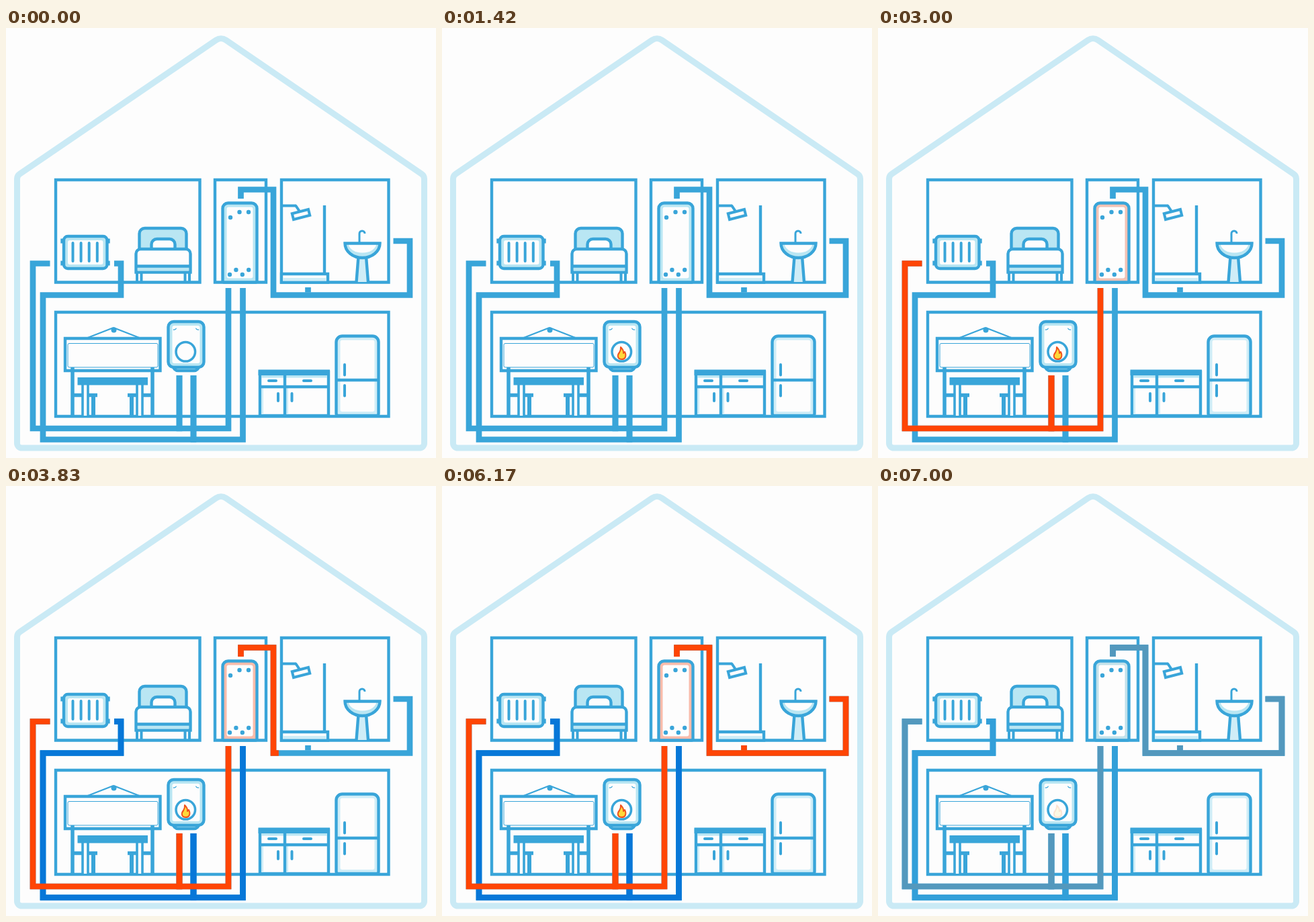
Recreate the animation shown at these times as an HTML page with a canvas. Size 640 by 640 pixels, loop 7.08 s.

```html
<!DOCTYPE html>
<html lang="en">
<head>
<meta charset="utf-8">
<title>Home heating</title>
<style>
html, body { margin: 0; width: 100%; height: 100%; overflow: hidden; background: #fdfdfd; }
canvas { display: block; width: 640px; height: 640px; }
</style>
</head>
<body>
<canvas id="stage" width="640" height="640"></canvas>
<script>
const ctx = document.getElementById('stage').getContext('2d');
const PAPER = '#fdfdfd', INK = '#39a5d9', WALL = '#caeaf5', TINT = '#b9e6f3', PALE = '#cfedf7';
const HOT = '#ff4505', COLD = '#0777d8', WARM = '#fbbcab';
const LOOP = 7080, FPS = 12, PIPE = 8.7, WEIGHT = 4.4;

// ---- helpers ----
const ramp = (t, a, b) => Math.min(1, Math.max(0, (t - a) / (b - a)));

function blend(a, b, k) {
  const part = (s, i) => parseInt(s.slice(i, i + 2), 16);
  const mix = [1, 3, 5].map(i => Math.round(part(a, i) + (part(b, i) - part(a, i)) * k));
  return `rgb(${mix.join(',')})`;
}

function stroke(width = WEIGHT, color = INK, cap = 'butt') {
  ctx.strokeStyle = color;
  ctx.lineWidth = width;
  ctx.lineCap = cap;
  ctx.stroke();
}

function fill(color) {
  ctx.fillStyle = color;
  ctx.fill();
}

function line(x1, y1, x2, y2, width, cap) {
  ctx.beginPath();
  ctx.moveTo(x1, y1);
  ctx.lineTo(x2, y2);
  stroke(width, INK, cap);
}

const across = (y, x1, x2, width) => line(x1, y, x2, y, width);
const down = (x, y1, y2, width) => line(x, y1, x, y2, width);
const handle = (x, y, w, h) => line(x, y, x + w, y + h, 4, 'round');

function box(x1, y1, x2, y2, r = 0, color = null, width = WEIGHT) {
  ctx.beginPath();
  ctx.roundRect(x1, y1, x2 - x1, y2 - y1, r);
  if (color) fill(color);
  if (width) stroke(width);
}

const solid = (x1, y1, x2, y2, color = INK) => box(x1, y1, x2, y2, 0, color, 0);

function circle(x, y, r, color, width = 0) {
  ctx.beginPath();
  ctx.arc(x, y, r, 0, 7);
  fill(color);
  if (width) stroke(width);
}

// Rounded body with a tinted rim inside its outline.
function shell(x1, y1, x2, y2, r, tint = TINT, rim = 6) {
  box(x1, y1, x2, y2, r, tint, 0);
  box(x1 + rim, y1 + rim, x2 - rim, y2 - rim, 3, PAPER, 0);
  box(x1, y1, x2, y2, r);
}

// Calls part(at) for both sides of a middle line; at(d) is d away from it.
function mirror(middle, part) {
  for (const side of [-1, 1]) part(d => middle + side * d, side);
}

// ---- pipes ----
// A route turns at right angles: after the first point, y and x alternate.
function route(x, y, upright, ...stops) {
  const pts = [[x, y]];
  for (const s of stops) {
    if (upright) y = s; else x = s;
    upright = !upright;
    pts.push([x, y]);
  }
  return pts;
}

const mains = 596, drain = 612.5, duct = 397.5;
const pipes = [
  { pts: route(161, 350.5, false, 171, duct, 55, drain, 279, 517), color: COLD, from: 3000, to: 3760 },
  { pts: route(352.5, 387, true, drain, 279, 517), color: COLD, from: 3000, to: 3760 },
  { pts: route(258, 517, true, mains, 40, 350.5, 65.5), color: HOT, from: 1480, to: 2500 },
  { pts: route(258, 517, true, mains, 331, 387), color: HOT, from: 1480, to: 2700 },
  { pts: route(349.5, 254, true, 240.5, 398, duct, 601, 317, 576.5), color: HOT, from: 3080, to: 4830 },
  { pts: route(449.5, duct - 4, true, 386), color: HOT, from: 3995, to: 4040 }
];

function pipe(pts, color, part = 1) {
  if (part <= 0) return;
  const len = pts.slice(1).reduce((sum, p, i) => sum + Math.hypot(p[0] - pts[i][0], p[1] - pts[i][1]), 0);
  if (part < 1) ctx.setLineDash([len * part, len]);
  ctx.beginPath();
  pts.forEach(p => ctx.lineTo(...p));
  stroke(PIPE, color);
  ctx.setLineDash([]);
}

// ---- building and furniture ----
function house() {
  ctx.beginPath();
  ctx.moveTo(320, 625);
  ctx.arcTo(16.5, 625, 16.5, 500, 7);
  ctx.arcTo(16.5, 220, 320, 13, 9);
  ctx.arcTo(320, 13, 622.5, 220, 13);
  ctx.arcTo(622.5, 220, 622.5, 500, 9);
  ctx.arcTo(622.5, 625, 320, 625, 7);
  ctx.closePath();
  stroke(9, WALL);
}

function rooms() {
  for (const [left, right] of [[74, 288.5], [311, 387], [410, 569.5]]) box(left, 226, right, 378.5);
  box(74, 423, 569.5, 578);
}

function radiator() {
  mirror(118, at => {
    for (const y of [317, 350]) down(at(34.5), y - 3.5, y + 3.5);
  });
  shell(86, 310, 150.5, 358, 6);
  for (let i = 0; i < 4; i++) handle(99.5 + i * 12.1, 320, 0, 27);
}

function bed() {
  box(198.5, 298, 268.5, 340, 8, TINT);
  box(216.5, 314, 251.5, 336, 8, PAPER);
  box(193.5, 329, 274.5, 363.5, [7, 7, 0, 0], PAPER);
  solid(196, 356, 272, 361.5, TINT);
  across(354.5, 194, 274);
  mirror(234, at => {
    down(at(39), 363, 377, 4);
    down(at(32.5), 363, 377, 4);
  });
}

function cylinder(heat) {
  shell(322.5, 260.5, 373.5, 378.5, [8, 8, 2, 2], blend(TINT, WARM, heat));
  for (let i = 0; i < 3; i++) circle(334 + i * 13.5, i ? 274 : 282, 3.2, INK);
  for (let i = 0; i < 4; i++) circle(333 + i * 9.4, i % 2 ? 360 : 367, 3.2, INK);
}

function shower() {
  down(474, 264, 366);
  across(264.5, 410, 432, 4);
  line(431, 264, 437, 273, 4);
  ctx.save();
  ctx.translate(439, 277.5);
  ctx.rotate(-0.25);
  box(-12.5, -4.5, 12.5, 4.5, 0, PAPER, 4);
  ctx.restore();
  box(410, 366, 479, 378.5, 0, PAPER);
  solid(412, 372, 477, 376.5, PALE);
}

function sink() {
  ctx.beginPath();
  ctx.moveTo(526, 320);
  ctx.lineTo(526, 306);
  ctx.arc(530, 306, 4, Math.PI, 0);
  stroke(3);
  ctx.beginPath();
  ctx.moveTo(521.5, 378);
  ctx.lineTo(524.5, 340);
  ctx.lineTo(536, 340);
  ctx.lineTo(539, 378);
  fill(PALE);
  stroke();
  const bowl = (w, h) => {
    ctx.beginPath();
    ctx.ellipse(530.5, 320.5, w, h, 0, 0, Math.PI);
    ctx.closePath();
  };
  bowl(26, 21.5);
  fill(TINT);
  bowl(21, 14);
  fill(PAPER);
  bowl(26, 21.5);
  stroke();
}

function dining() {
  const mid = 158.5;
  mirror(160, at => line(at(0), 446, at(41), 462, 2));
  circle(160.5, 449.5, 4, INK);
  mirror(mid, at => {
    down(at(59.5), 505, 578, 5.5);
    across(546.5, at(59.5), at(22.5), 5.5);
    down(at(28.5), 547, 578, 6);
    solid(at(44.5), 531, at(36.5), 577, PAPER);
    down(at(44.5), 531, 578, 3.6);
    down(at(36.5), 531, 578, 3.6);
  });
  solid(106.5, 520, 211, 531.5);
  box(88, 462, 229.5, 510, 0, PAPER);
  box(92, 469.5, 226, 505, 2, null, 1);
  mirror(mid, at => down(at(59.5), 505, 512, 5.5));
}

function boiler() {
  box(249, 500, 287, 510, [0, 0, 7, 7], TINT);
  shell(241.5, 437, 294.5, 505, 8);
  mirror(268, (at, side) => {
    const middle = Math.PI / 2 + side * 0.4;
    ctx.beginPath();
    ctx.arc(at(18), 445, 4, middle - 0.7, middle + 0.7);
    stroke(1.2);
  });
  circle(267.3, 481.8, 14.3, PAPER, 3.5);
}

function flame(alpha) {
  if (alpha <= 0) return;
  ctx.save();
  ctx.globalAlpha = alpha;
  ctx.lineJoin = 'round';
  ctx.beginPath();
  ctx.moveTo(266, 475);
  ctx.quadraticCurveTo(270.5, 479, 270, 484);
  ctx.lineTo(272, 482);
  ctx.bezierCurveTo(275, 488, 273, 493, 267.5, 493);
  ctx.bezierCurveTo(261, 493, 260.5, 487, 264, 483);
  ctx.quadraticCurveTo(266.5, 479, 266, 475);
  ctx.closePath();
  fill('#ffd83a');
  stroke(2, '#f0521c');
  ctx.restore();
}

function kitchen() {
  box(378, 512, 480, 577, 0, PAPER);
  solid(380, 517, 478, 520.5, TINT);
  for (const x of [380, 417]) solid(x, 536, x + 3, 575, PALE);
  solid(375.5, 508.5, 482, 517);
  across(534, 378, 480);
  down(415, 515, 577);
  for (const x of [391, 443]) handle(x, 525, 11, 0);
  for (const x of [405, 425.5]) handle(x, 544, 0, 11);
}

function fridge() {
  shell(491.5, 458.5, 554.5, 577, [9, 9, 3, 3], PALE);
  across(524, 492, 554);
  for (const y of [501, 532]) handle(504, y, 0, 15.5);
}

// ---- animation ----
function draw(t) {
  const fade = 1 - ramp(t, 6600, 7060);
  solid(0, 0, 640, 640, PAPER);
  house();
  rooms();
  radiator();
  bed();
  cylinder(ramp(t, 2700, 3050) * fade);
  shower();
  sink();
  dining();
  boiler();
  flame(ramp(t, 1080, 1330) * fade);
  kitchen();
  fridge();
  for (const p of pipes) pipe(p.pts, INK);
  for (const p of pipes) pipe(p.pts, blend(INK, p.color, fade), ramp(t, p.from, p.to));
}

// Number of the picture on show; each start is rounded down to 10 ms.
const step = t => Math.ceil((Math.floor(t / 10) + 1) * FPS / 100) - 1;

const start = performance.now();
function tick() {
  const t = Math.max(0, performance.now() - start) % LOOP;
  draw(step(t) * 1000 / FPS);
  requestAnimationFrame(tick);
}
tick();
</script>
</body>
</html>
```
